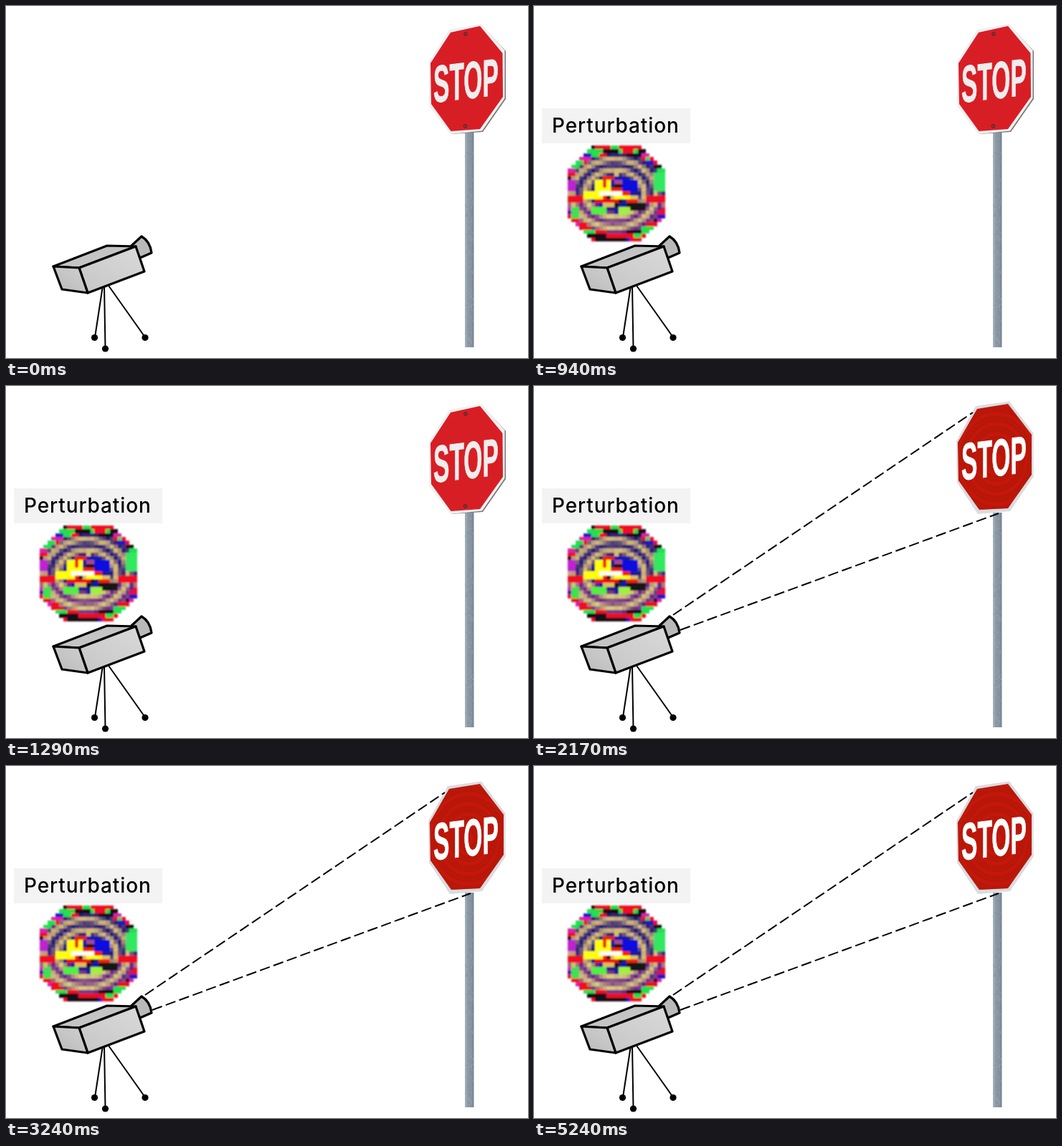
Write an HTML page that moves like this. It is 728 px wide and 492 px high and loops after 5690 ms.

```html
<!DOCTYPE html>
<html lang="en">
<head>
<meta charset="utf-8">
<title>Projected perturbation</title>
<style>
  html, body { margin: 0; width: 100%; height: 100%; overflow: hidden; background: #fff; }
  svg { display: block; width: 728px; height: 492px; }
  .label { font: 500 28px Inter, sans-serif; letter-spacing: .9px; }
  .stop { font: bold 73px "Liberation Sans", Arial, sans-serif; stroke-width: 1; }
  .body { stroke: #000; stroke-width: 3.2; stroke-linejoin: round; }
</style>
</head>
<body>
<svg viewBox="0 0 728 492">
  <defs>
    <linearGradient id="steel">
      <stop offset="0" stop-color="#aab4bc"/>
      <stop offset=".3" stop-color="#8d9ba7"/>
      <stop offset=".75" stop-color="#84929e"/>
      <stop offset="1" stop-color="#71808c"/>
    </linearGradient>
    <linearGradient id="side" x1="0" y1="1" x2="1" y2="0">
      <stop offset="0" stop-color="#c6c6c6"/><stop offset="1" stop-color="#dadada"/>
    </linearGradient>
    <linearGradient id="front" x1="0" y1="1" x2="1" y2="0">
      <stop offset="0" stop-color="#bababa"/><stop offset="1" stop-color="#d0d0d0"/>
    </linearGradient>
    <clipPath id="face">
      <path d="M618 32 661 25 694 68V124L661 171 621 173 592 132 591 79Z"/>
    </clipPath>
    <filter id="soft"><feGaussianBlur stdDeviation="2"/></filter>
    <filter id="slight"><feGaussianBlur stdDeviation=".8"/></filter>
  </defs>

  <g id="pole"><path d="M640 177H652.5V477H640Z" fill="url(#steel)"/></g>

  <g id="plain">
    <path d="M619 36 664 27 697 63V130L665 176 621 179Z" fill="#777"/>
    <path d="M618 33 663 25 695.5 62V129L664 174.5 620 179 590 140V78Z" fill="#f2f0f0"/>
    <path d="M620 37 661 28 692.5 66 693 127 661 172 620.5 175 593 137 592 80Z" fill="#d81e25"/>
    <g fill="#7d3c3c" stroke="#4e2020">
      <circle cx="641" cy="39" r="2.3"/><circle cx="640.5" cy="168" r="2.3"/>
    </g>
    <text class="stop" transform="matrix(.46 -.055 0 1 596 135)" fill="#efeded" stroke="#efeded">STOP</text>
  </g>

  <g id="lit">
    <path d="M616 28 663 21.5 696.5 66V127L664 175 619 179 590 135 589 77Z" fill="#d9dce0"/>
    <g clip-path="url(#face)">
      <path d="M588 20H698V180H588Z" fill="#c4190c"/>
      <g id="rings" fill="none" filter="url(#soft)"/>
    </g>
    <text class="stop" transform="matrix(.46 -.055 0 1 596 131.5)" fill="#fff" stroke="#fff">STOP</text>
    <path d="M194 320 612 37M204 341 648 178" fill="none" stroke="#000" stroke-width="2" stroke-dasharray="14.5 5.5"/>
  </g>

  <g id="noise">
    <path d="M11 143H218V192H11Z" fill="#f3f3f3"/>
    <text class="label" x="25" y="177">Perturbation</text>
    <g id="cells" shape-rendering="crispEdges" filter="url(#slight)"/>
  </g>

  <g id="camera">
    <path d="M135 391 124 463M137 391 138.5 479M141 388 194 463" fill="none" stroke="#000" stroke-width="2"/>
    <circle cx="123.5" cy="463.5" r="4.6"/><circle cx="138.5" cy="479" r="4.6"/><circle cx="194" cy="463.5" r="4.6"/>
    <g class="body">
      <path d="M175 335 189 322Q201 329 203 345L187 352Z" fill="#b9b9b9"/>
      <path d="M66 364 141 335 181 336 102 366Z" fill="#c4c4c4"/>
      <path d="M102 366 181 336 193 371 114 401Z" fill="url(#side)"/>
      <path d="M66 364 102 366 114 401 78 396Z" fill="url(#front)"/>
    </g>
  </g>
</svg>
<script>
const LOOP = 5690, NOISE_AT = 940, PROJECT_AT = 2170;
const get = id => document.getElementById(id);

function add(parent, tag, attrs) {
  const node = document.createElementNS(parent.namespaceURI, tag);
  for (const name in attrs) node.setAttribute(name, attrs[name]);
  parent.append(node);
}

let seed = 11;
const random = () => (seed = seed * 16807 % 2147483647) / 2147483647;
const pick = list => list[Math.floor(random() * list.length)];

function drawPole() {
  for (let i = 0; i < 150; i++) {
    add(get('pole'), 'rect', {
      x: 640 + random() * 11, y: 180 + random() * 295, width: 1, height: 1 + random() * 2,
      fill: pick(['#b5c0c9', '#687885']), opacity: .4
    });
  }
}

function drawRings() {
  for (let r = 14; r < 85; r += 14) {
    add(get('rings'), 'ellipse', {
      cx: 645, cy: 102, rx: r * .85, ry: r,
      stroke: '#a00f08', 'stroke-width': 5, opacity: .55
    });
  }
}

const mix = (a, b, k) => `rgb(${a.map((v, i) => Math.round(v + (b[i] - v) * k))})`;

// Coarse coloured cells: bright rim, smooth arcs, hot centre.
function drawCells() {
  const N = 25, left = 47, top = 195, w = 136 / N, h = 134 / N;
  const rim = ['#f01020', '#f01020', '#181018', '#d820b0', '#20e050', '#2818c0'];
  const core = ['#d8c060', '#201a88', '#f02010', '#1818b0', '#181818', '#a04890'];
  const upper = [[36, 22, 120], [214, 186, 122]];
  const lower = [[108, 36, 138], [218, 204, 122]];
  const patches = [
    ['#f01020', 7, 0, 4, 1], ['#f01020', 0, 13, 4, 2], ['#f01020', 20, 13, 5, 2],
    ['#30e860', 22, 7, 3, 5], ['#c020d0', 0, 9, 2, 3], ['#40e050', 1, 16, 2, 3],
    ['#1010e0', 14, 9, 4, 3], ['#ffff10', 7, 9, 4, 3], ['#f02010', 9, 8, 1, 3],
    ['#ffff10', 4, 12, 5, 2], ['#fffff0', 8, 12, 6, 1], ['#ffff10', 12, 13, 4, 1],
    ['#f01010', 7, 14, 6, 1], ['#181818', 15, 15, 5, 2], ['#50f040', 6, 16, 4, 2],
    ['#a0f040', 13, 16, 3, 2]
  ];
  const cell = (x, y, nx, ny, fill) => add(get('cells'), 'rect', {
    x: left + x * w, y: top + y * h, width: nx * w, height: ny * h, fill
  });
  for (let y = 0; y < N; y++) {
    let run = 0, fill;
    for (let x = 0; x < N; x++) {
      const dx = x - 12, dy = y - 12;
      if (Math.abs(dx) + Math.abs(dy) > 18) continue;
      const r = Math.hypot(dx * .9, dy * 1.1);
      if (r > 5.5 && r < 11.3) {
        const light = .5 + .5 * Math.sin(r * 2.1 + dx * .12) + (random() - .5) * .2;
        fill = mix(...(dy < 3 ? upper : lower), Math.min(1, Math.max(0, light)));
        run = 0;
      } else if (run-- <= 0) {
        fill = pick(r <= 5.5 ? core : rim);
        run = Math.floor(random() * 4);
      }
      cell(x, y, 1, 1, fill);
    }
  }
  for (const [fill, x, y, nx, ny] of patches) cell(x, y, nx, ny, fill);
}

const show = (id, on) => get(id).style.display = on ? '' : 'none';

function frame() {
  const t = performance.now() % LOOP;
  show('noise', t >= NOISE_AT);
  show('plain', t < PROJECT_AT);
  show('lit', t >= PROJECT_AT);
  requestAnimationFrame(frame);
}

drawPole();
drawRings();
drawCells();
frame();
</script>
</body>
</html>
```
